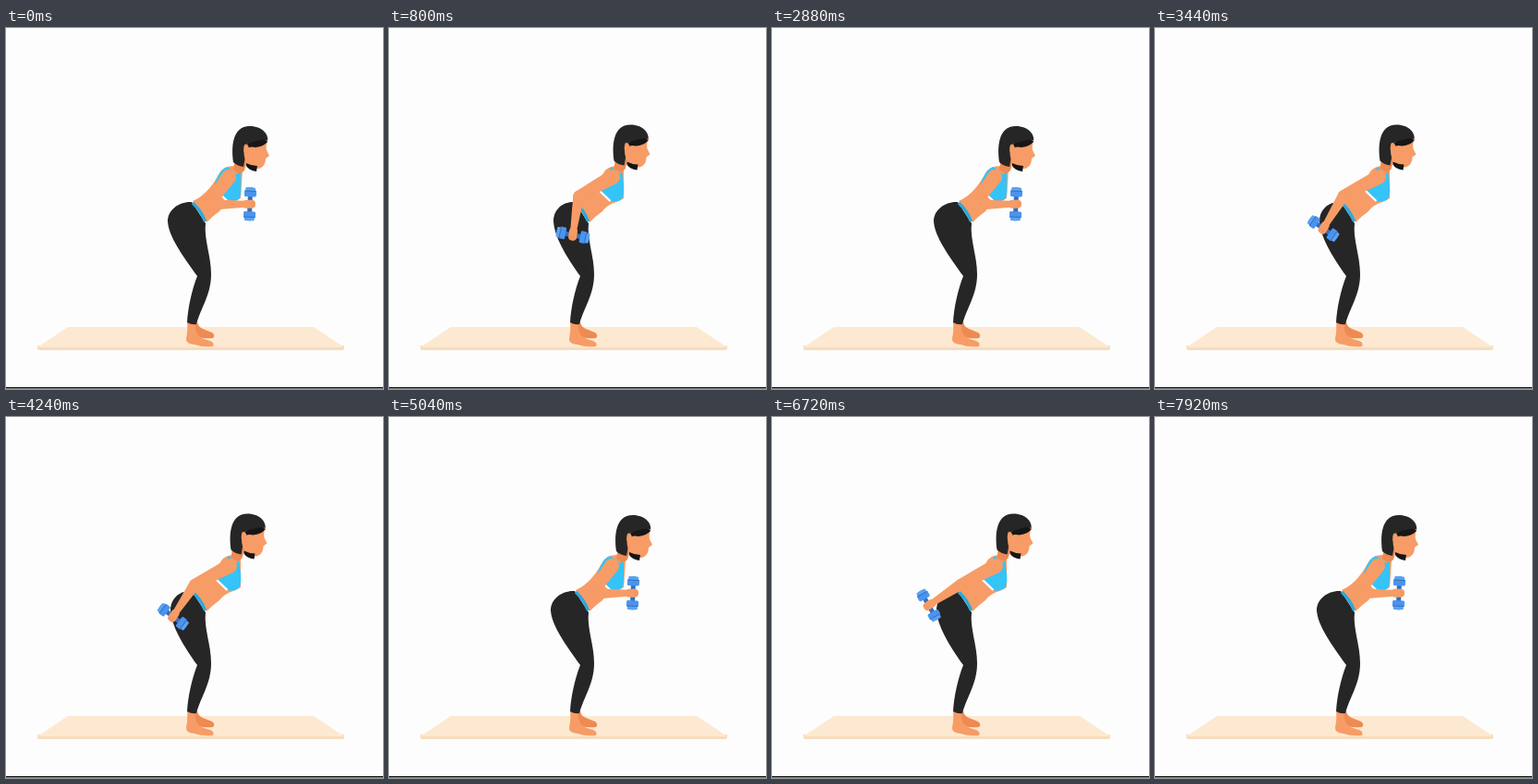
Recreate the animation shown at these times as an HTML page with a canvas. Size 408 px wide and 390 px high, loop 8 s.

```html
<!DOCTYPE html>
<html lang="en">
<head>
<meta charset="utf-8">
<title>Dumbbell kickback</title>
<style>
html, body { margin: 0; width: 100%; height: 100%; overflow: hidden; background: #fdfdfd; }
canvas { display: block; }
</style>
</head>
<body>
<canvas id="stage" width="408" height="390"></canvas>
<script>
const ctx = document.getElementById('stage').getContext('2d');
const LOOP = 8000, REP = 2560, MIDDLE = 1285;
const SKIN = '#f79c66', SHADE = '#ee8a52', BLACK = '#262626', BLUE = '#35c3f8';

const ramp = (x, a, b) => Math.min(1, Math.max(0, (x - a) / (b - a)));
const smooth = x => x * x * (3 - 2 * x);
const mix = (a, b, k) => a + (b - a) * k;

function fill(color, d) {
  ctx.fillStyle = color;
  ctx.fill(new Path2D(d));
}

function line(color, width, d) {
  ctx.strokeStyle = color;
  ctx.lineWidth = width;
  ctx.stroke(new Path2D(d));
}

function box(color, x, y, w, h, r) {
  ctx.fillStyle = color;
  ctx.beginPath();
  ctx.roundRect(x, y, w, h, r);
  ctx.fill();
}

// Tapered limb with round ends
function limb(x1, y1, r1, x2, y2, r2) {
  const a = Math.atan2(y2 - y1, x2 - x1), q = Math.PI / 2;
  ctx.fillStyle = SKIN;
  ctx.beginPath();
  ctx.arc(x1, y1, r1, a + q, a - q);
  ctx.arc(x2, y2, r2, a - q, a + q);
  ctx.fill();
}

function drawFloor() {
  fill('#f8dcbb', 'M34 343H366V346Q366 348 363 348H37Q34 348 34 346Z');
  fill('#fde9d1', 'M67 323H333L366 345H34Z');
  box('#0c0c0c', 0, 388, 408, 1.6, 0);
}

function drawLegs(lean) {
  fill(SHADE, 'M198 317L207 317Q207 322 213 325L223 329Q227 332 224 335Q216 336 208 334L199 333Z');
  fill(SKIN, 'M196 317H205Q204 325 207 331Q211 336 221 338Q226 340 224 344Q212 345 204 342Q194 341 195 335Q197 328 196 317Z');
  const hip = mix(175, 178, lean);
  fill(BLACK, `M201 188C188 187 ${hip} 196 ${hip} 209C${hip + 1} 225 191 246 207 268
    C201 283 197 302 196 318Q201 321 206 320C211 302 222 288 222 266C222 246 214 228 216 211Z`);
  line('#2ba8dc', 3.5, 'M202 189Q211 197 215.5 209');
}

function drawTorso(lean) {
  const m = (a, b) => mix(a, b, lean);
  fill(SKIN, `M202 187C216 181 224 169 ${m(231, 232)} 157Q${m(235, 236)} 149 247 149
    L${m(256, 254)} 153L254 184L246 188Q236 191 231 198Q224 203 217 210Q212 196 202 187Z`);
  fill(BLUE, `M${m(239, 241)} 150Q${m(231, 239)} 153 ${m(226, 231)} 168L226 175L239 187
    Q247 189 252 185Q255 180 254 170L${m(254, 252)} 155L${m(250, 249)} 158Z`);
  line('#fff', 2.4, 'M226.5 174.5L239.5 187');
}

function drawHead() {
  fill(SHADE, 'M248 140H262L258 154Q253 160 246 153Z');
  fill(BLACK, 'M246 145C244 130 244 106 264 106C277 106 285 115 283 123L261 128L257 150Q250 149 246 145Z');
  fill(SKIN, 'M258 126L283 121Q281 128 282 132L285 138L281 141Q281 148 276 151Q271 154 261 147Q256 139 258 126Z');
  fill('#161616', 'M257 130Q260 124 272 122Q281 119 283 123Q279 128 270 129Q263 127 258 132Z');
  fill('#161616', 'M260 146Q266 149 272 149L271 155Q263 154 260 149Z');
  ctx.fillStyle = SKIN;
  ctx.beginPath();
  ctx.ellipse(260, 131, 2.8, 5, 0, 0, 7);
  ctx.fill();
}

function drawDumbbell() {
  box('#346fc0', -2.5, -18, 5, 36, 1);
  for (const side of [-1, 1]) {
    ctx.save();
    ctx.scale(1, side);
    box('#4a94ee', -6.5, 8, 13, 7, 1.5);
    box('#5aa2f3', -5.5, 14, 11, 4, 1.5);
    box('#346fc0', -6, 13.5, 12, 1, 0);
    ctx.restore();
  }
}

function drawArm(back, kick, lean) {
  const sx = mix(241, 242, lean), sy = 161;
  const ex = mix(219, 204, back), ey = mix(191, 181, back);
  const angle = mix(-1, 150, kick) * Math.PI / 180;
  const reach = mix(45, 41, kick);
  limb(sx, sy, 8, ex, ey, 6);
  ctx.save();
  ctx.translate(ex, ey);
  ctx.rotate(angle);
  limb(0, 0, 6, reach - 6, 0, 3.5);
  ctx.translate(reach, 0);
  ctx.save();
  ctx.rotate(0.06);
  drawDumbbell();
  ctx.restore();
  box(SKIN, -8, -4.5, 14, 9, 4);
  line(SHADE, 0.8, 'M1 -1H5M1 2H5');
  ctx.restore();
}

function draw(now) {
  const away = Math.abs(now % LOOP % REP - MIDDLE);
  const kick = 1 - ramp(away, 305, 830);
  const back = 1 - smooth(ramp(away, 400, 880));
  const lean = 1 - smooth(ramp(away, 560, 900));

  ctx.fillStyle = '#fdfdfd';
  ctx.fillRect(0, 0, 408, 390);
  drawFloor();
  drawTorso(lean);
  drawLegs(lean);
  ctx.save();
  ctx.translate(-2.5 * lean, -1.5 * lean);
  drawHead();
  ctx.restore();
  drawArm(back, kick, lean);
}

function frame() {
  draw(performance.now());
  requestAnimationFrame(frame);
}
frame();
</script>
</body>
</html>
```
